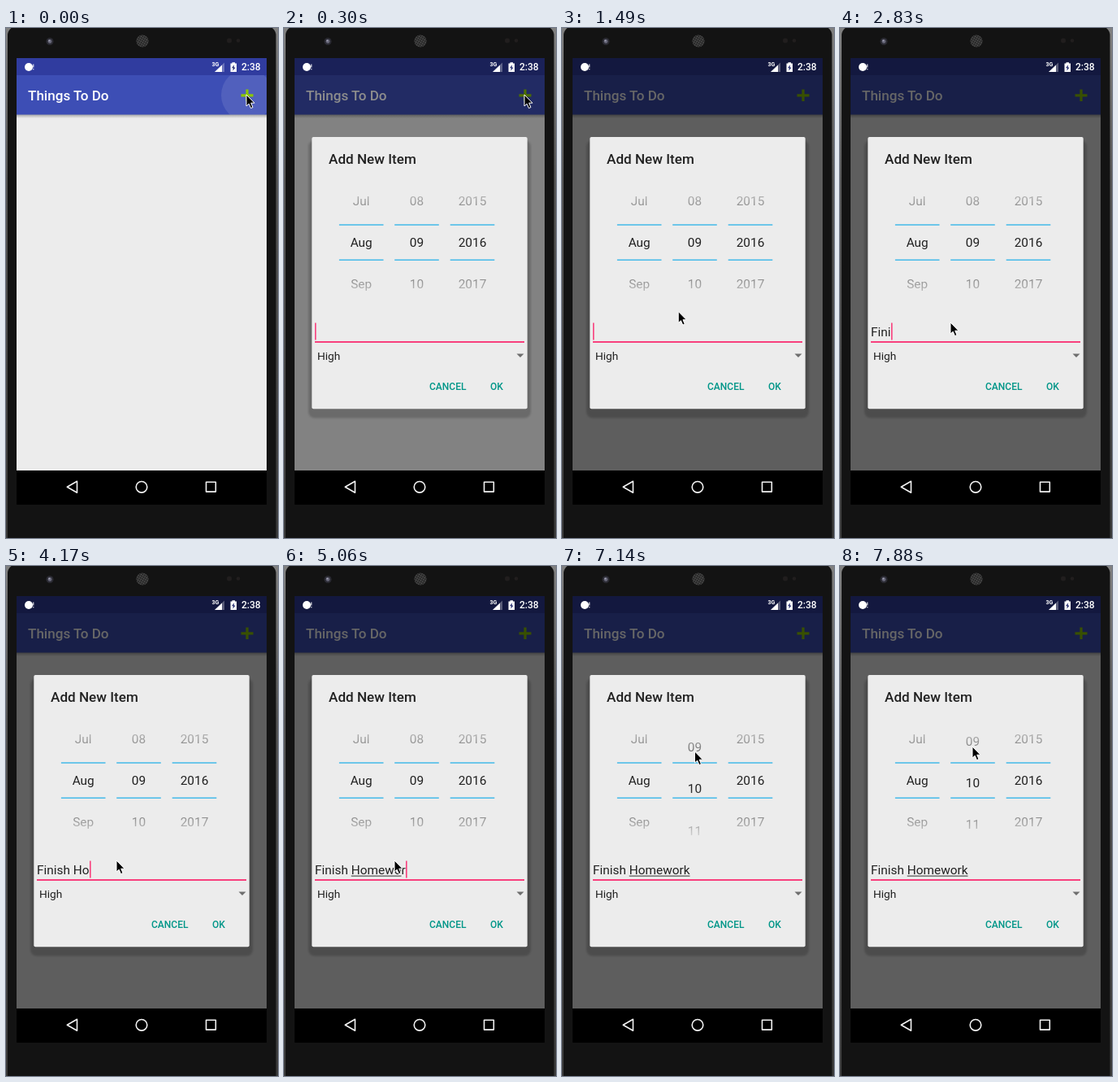
Write an HTML page that moves like this. It is 335 by 627 pixels and loops after 8 s.

```html
<!DOCTYPE html>
<html lang="en">
<head>
<meta charset="utf-8">
<title>Add item dialog</title>
<style>
  html, body { margin: 0; width: 100%; height: 100%; overflow: hidden; background: #121212; }
  svg { display: block; width: 335px; height: 627px; font-family: Roboto, "Noto Sans", sans-serif; }
  text { white-space: pre; }
  .title { font-size: 17.1px; font-weight: 500; }
  .mid { text-anchor: middle; }
  .button { font-size: 12px; font-weight: 500; fill: #009688; }
  #wheels, #typed { font-size: 15.4px; fill: #212121; }
</style>
</head>
<body>
<svg viewBox="0 0 335 627">
  <defs>
    <linearGradient id="edge" x1="0" y1="0" x2="0" y2="1">
      <stop offset="0" stop-color="#808080"/><stop offset=".3" stop-color="#555"/>
      <stop offset="1" stop-color="#3a3a3a"/>
    </linearGradient>
    <linearGradient id="barShade" x1="0" y1="0" x2="0" y2="1">
      <stop offset="0" stop-opacity=".32"/><stop offset="1" stop-opacity="0"/>
    </linearGradient>
    <linearGradient id="fade" gradientUnits="userSpaceOnUse" x1="0" y1="187" x2="0" y2="341">
      <stop offset="0" stop-color="#fff" stop-opacity="0"/><stop offset=".45" stop-color="#fff"/>
      <stop offset=".55" stop-color="#fff"/><stop offset="1" stop-color="#fff" stop-opacity="0"/>
    </linearGradient>
    <mask id="wheelMask" maskUnits="userSpaceOnUse" x="34" y="187" width="266" height="154">
      <rect x="34" y="187" width="266" height="154" fill="url(#fade)"/>
    </mask>
    <pattern id="mesh" width="2.6" height="2.6" patternUnits="userSpaceOnUse" patternTransform="rotate(30)">
      <rect width="2.6" height="2.6" fill="#222"/><circle cx="1.3" cy="1.3" r=".85" fill="#5c5c5c"/>
    </pattern>
    <clipPath id="barClip"><rect x="13" y="58" width="308" height="48.5"/></clipPath>
    <filter id="soft" x="-10%" y="-10%" width="120%" height="120%"><feGaussianBlur stdDeviation="1"/></filter>
  </defs>

  <!-- phone body -->
  <rect width="335" height="627" fill="url(#edge)"/>
  <rect x="2" y="-2" width="330.5" height="660" rx="11" fill="#131313"/>
  <circle cx="54" cy="16.5" r="4.5" fill="#2b2b33"/>
  <circle cx="54" cy="16.5" r="2.4" fill="#666678"/>
  <circle cx="53.3" cy="15.6" r="1" fill="#a5a5b8"/>
  <circle cx="168" cy="16" r="7.6" fill="url(#mesh)"/>
  <circle cx="275" cy="15.5" r="3" fill="#211e1e"/>
  <circle cx="286" cy="15.5" r="2.3" fill="#211e1e"/>

  <!-- app -->
  <rect x="13" y="106" width="308" height="438" fill="#ececec"/>
  <rect x="13" y="106" width="308" height="5" fill="url(#barShade)"/>
  <rect x="13" y="37" width="308" height="21.5" fill="#303c9f"/>
  <rect x="13" y="58" width="308" height="48.5" fill="#3d4eb5"/>
  <circle id="ripple" cx="297" cy="82.5" r="32" fill="#fff" opacity=".1" clip-path="url(#barClip)"/>
  <text class="title" x="27" y="89" fill="#fff">Things To Do</text>
  <path d="M297 75.5v14.5M289.5 82.8h15" stroke="#8cc800" stroke-width="3.2"/>
  <rect id="dim" x="13" y="37" width="308" height="507"/>

  <!-- status icons -->
  <g fill="#fff">
    <circle cx="28" cy="48" r="5"/>
    <path d="M33.8 44.5v4M33.8 50v1.3" stroke="#fff"/>
    <text x="253.5" y="47" font-size="7" font-weight="700">3G</text>
    <path d="M257 54L269 42.5V54Z" opacity=".3"/>
    <path d="M257 54L266 45.4V54Z"/>
    <path d="M276.5 43.5h2v-1.3h3.5v1.3h2v10.5h-7.5Z"/>
    <path d="M281 45.3l-3 4h1.9l-.6 3.4 3.2-4.2h-1.9Z" fill="#20286c"/>
    <text x="290" y="52" font-size="12" font-weight="500">2:38</text>
  </g>

  <!-- navigation bar -->
  <rect x="13" y="544" width="308" height="42"/>
  <g fill="none" stroke="#f2f2f2" stroke-width="1.6" stroke-linejoin="round">
    <path d="M75.300 564.300L87.500 557.300V571.300Z"/>
    <circle cx="167" cy="564.300" r="6.800"/>
    <rect x="246.500" y="558.300" width="11.800" height="11.800"/>
  </g>

  <g id="dialog">
    <rect x="30" y="138" width="274" height="341.500" rx="8" opacity=".18" filter="url(#soft)"/>
    <rect x="34.300" y="134" width="265.400" height="334.200" rx="2" fill="#ececec"/>
    <text class="title" x="55" y="167" fill="#212121">Add New Item</text>
    <g id="wheels" mask="url(#wheelMask)"></g>
    <g id="lines" fill="#4fbde9"></g>
    <rect x="38" y="385" width="258" height="2" fill="#f8407d"/>
    <text id="typed" x="38" y="379"></text>
    <rect id="under" y="380.600" height="1" fill="#333"/>
    <rect id="caret" y="362.500" width="1.600" height="21" fill="#f8407d"/>
    <text x="41" y="408" font-size="13.700" fill="#212121">High</text>
    <path d="M286.500 400.500h9l-4.500 4.500Z" fill="#6e6e6e"/>
    <text class="button" x="179" y="445">CANCEL</text>
    <text class="button" x="254" y="445">OK</text>
  </g>

  <path id="pointer" d="M0 0V14L3.200 11.200L5.500 16.600L8 15.500L5.700 10.200H10Z"
        stroke="#fff" stroke-linejoin="round"/>
</svg>

<script>
const LOOP = 8000, TICK = 148.5;   // the screen refreshes once per tick
const ROW = 51.3, MIDDLE = 269, LEFT = 38;
const PHRASE = "Finish Homework", WORD = PHRASE.indexOf("H");
const NS = "http://www.w3.org/2000/svg";
const el = id => document.getElementById(id);

function add(parent, tag, attrs, content = "") {
  const node = document.createElementNS(NS, tag);
  set(node, attrs);
  node.textContent = content;
  return parent.appendChild(node);
}

function set(node, attrs) {
  for (const key in attrs) node.setAttribute(key, attrs[key]);
}

function addWheel(x, labels) {
  const wheel = add(el("wheels"), "g", {});
  labels.forEach((label, i) =>
    add(wheel, "text", { class: "mid", x, y: MIDDLE + (i - 1) * ROW }, label));
  for (const y of [241.2, 284.4])
    add(el("lines"), "rect", { x: x - 27.3, y, width: 54.6, height: 1.6 });
  return wheel;
}

addWheel(95.2, ["Jul", "Aug", "Sep"]);
const dayWheel = addWheel(163.5, ["08", "09", "10", "11"]);
addWheel(232, ["2015", "2016", "2017"]);

const progress = (n, from, to) => Math.min(1, Math.max(0, (n - from) / (to - from)));
const easeOut = p => 1 - (1 - p) ** 2;
const smooth = p => p * p * (3 - 2 * p);

// Pointer glides: first tick, last tick, end point
const glides = [
  [5, 7, 164, 310], [8, 11, 136, 362],
  [37, 38, 130, 345], [38, 41, 164, 249], [41, 43, 166, 260],
  [45, 49, 163, 222]
];

function pointerAt(n) {
  let x = 296, y = 82;
  for (const [from, to, endX, endY] of glides) {
    const p = smooth(progress(n, from, to));
    x += (endX - x) * p;
    y += (endY - y) * p;
  }
  return [x, y];
}

// The first word is typed steadily, the second with growing speed.
function lettersAt(n) {
  if (n < 15) return 0;
  if (n < 26) return Math.min(WORD, 1 + Math.floor(.79 * (n - 15)));
  return Math.min(PHRASE.length, WORD + 1 + Math.floor(.502 * (n - 26) ** 1.2));
}

function caretOn(n) {
  if (n >= 15 && n <= 35) return true;
  const start = n < 15 ? .9 : 35.4;
  return Math.floor((n - start) / 3.25) % 2 === 0;
}

const typed = el("typed");
const widthOf = n => n ? typed.getSubStringLength(0, n) : 0;

function draw(t) {
  const n = Math.floor(t / TICK), open = n >= 2;
  const [x, y] = pointerAt(n);
  set(el("dim"), { opacity: .6 * easeOut(progress(n, 1, 3)) });
  set(el("pointer"), { transform: `translate(${x} ${y})` });
  set(dayWheel, { transform: `translate(0 ${-48.4 * smooth(progress(n, 45, 49))})` });
  el("ripple").style.display = open ? "none" : "";
  el("dialog").style.display = open ? "" : "none";
  if (!open) return;

  const count = lettersAt(n), content = PHRASE.slice(0, count);
  if (typed.textContent !== content) typed.textContent = content;
  set(el("caret"), { x: Math.round(LEFT + widthOf(count)), opacity: caretOn(n) ? 1 : 0 });

  // The underline trails the letters by one tick.
  const marked = count > WORD + 2;
  const start = marked ? widthOf(WORD) : 0;
  const end = marked ? widthOf(lettersAt(n - 1)) : 0;
  set(el("under"), { x: LEFT + start, width: end - start });
}

const began = performance.now();
function tick() {
  draw((performance.now() - began) % LOOP);
  requestAnimationFrame(tick);
}
tick();
</script>
</body>
</html>
```
